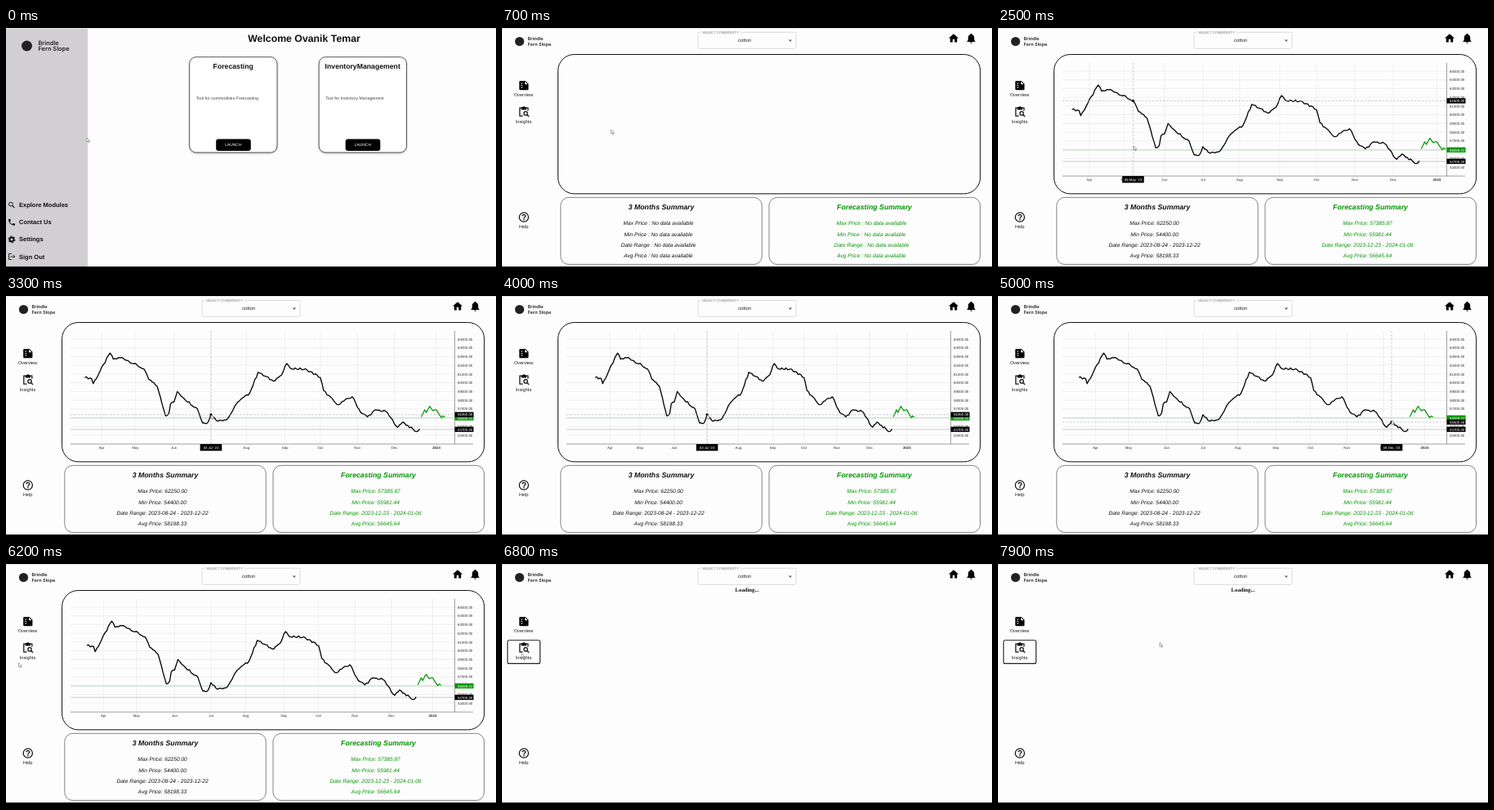
An HTML page that plays this animation: 600 by 295 pixels, repeating every 8 s.

```html
<!DOCTYPE html>
<html lang="en">
<head>
<meta charset="utf-8">
<title>Commodity forecasting dashboard</title>
<style>
  html, body { margin: 0; width: 100%; height: 100%; overflow: hidden; background: #fefdfe; }
  svg { display: block; }
  text { font-family: "Liberation Sans", Arial, sans-serif; text-rendering: geometricPrecision; fill: #111; }
  .mid { text-anchor: middle; }
  .bold { font-weight: 700; }
  .brand { font-family: Inter, sans-serif; font-weight: 600; fill: #222; }
  .loading { font: 700 6.7px "Liberation Serif", serif; }
  .nav text { font-size: 5.7px; fill: #222; }
  .menu text { font-size: 7.5px; font-weight: 700; }
  .cards .card { fill: #fff; stroke: #333; stroke-width: .8; filter: drop-shadow(0 1px 1px #0004); }
  .cards .title { font-size: 8.7px; font-weight: 700; }
  .cards .note { font-size: 5.2px; fill: #444; }
  .cards .launch { font-size: 4.9px; fill: #fff; }
  .panels rect { fill: none; stroke: #444; stroke-width: .65; }
  .panels .main { stroke: #111; stroke-width: 1; }
  .head { font-size: 8.75px; font-weight: 700; font-style: italic; }
  .row { font-size: 6.6px; font-style: italic; }
  .green { fill: #009600; }
  .chart text { font-size: 4.4px; fill: #333; }
  .chart .tag text { fill: #fff; }
  .grid { stroke: #e8e9ec; stroke-width: .7; }
  .line { fill: none; stroke-width: 1.3; stroke-linejoin: round; }
  .dash { stroke: #a4a7ae; stroke-width: .6; stroke-dasharray: 2.4 2; }
</style>
</head>
<body>
<svg width="600" height="295" viewBox="0 0 600 295">
  <rect width="600" height="295" fill="#fefdfe"/>

  <g id="home">
    <rect y="1" width="100" height="293" fill="#d1cfd1"/>
    <circle cx="25.5" cy="22" r="6.5" fill="#222"/>
    <text class="brand" x="39.5" y="21.3" font-size="7.4">Brindle</text>
    <text class="brand" x="39.5" y="28.3" font-size="7.4">Fern Slope</text>
    <g class="menu" id="menu"></g>
    <text class="mid bold" x="365" y="17" font-size="12.3">Welcome Ovanik Temar</text>
    <g class="cards" id="cards"></g>
  </g>

  <g id="dash">
    <circle cx="21.5" cy="16.5" r="5.6" fill="#222"/>
    <text class="brand" x="31.5" y="15.2" font-size="5.6">Brindle</text>
    <text class="brand" x="31.5" y="22" font-size="5.6">Fern Slope</text>
    <rect x="240" y="5.3" width="120" height="20" rx="2" fill="none" stroke="#d2d2d2" stroke-width=".8"/>
    <rect x="243.5" y="3" width="48" height="5" fill="#fefdfe"/>
    <text x="245" y="6.6" font-size="4.35" style="fill:#777">SELECT COMMODITY</text>
    <text class="mid" x="297" y="17.2" font-size="5.9" style="fill:#222">cotton</text>
    <path d="M350.8 14.6h4.4l-2.2 2.3z" fill="#666"/>
    <g class="nav" id="nav"></g>
    <rect id="focus" x="6.8" y="93.8" width="39.8" height="28.6" rx="2" fill="none" stroke="#222" stroke-width="1.1"/>
    <text id="loading" class="loading mid" x="300" y="34">Loading...</text>

    <g id="board">
      <g class="panels">
        <rect class="main" x="68.6" y="32.5" width="517" height="171.3" rx="20"/>
        <rect x="71.8" y="208.3" width="246.5" height="82.3" rx="10"/>
        <rect x="327" y="208.3" width="258.5" height="82.3" rx="10"/>
      </g>
      <text class="head mid" x="195" y="223.2">3 Months Summary</text>
      <text class="head mid green" x="456" y="223.2">Forecasting Summary</text>
      <g id="empty"></g>
      <g id="filled"></g>
      <g class="chart" id="chart">
        <path class="grid" id="grid"/>
        <g id="prices"></g>
        <g id="months"></g>
        <path d="M79 182H572M549.5 43V182" fill="none" stroke="#777" stroke-width=".7"/>
        <path d="M79 150H549" stroke="#a9cba9" stroke-width=".7"/>
        <path d="M79 164H549" stroke="#b4b4b4" stroke-width=".7"/>
        <path class="line" id="past" stroke="#000"/>
        <path class="line" id="future" stroke="#0a9a0a"/>
        <g class="tag">
          <rect x="549.5" y="146.6" width="23" height="6.4" fill="#0a960a"/>
          <text x="553" y="151.5">56059.21</text>
          <rect x="549.5" y="160.7" width="23" height="6.4"/>
          <text x="553" y="165.5">54700.00</text>
        </g>
        <g id="cross">
          <path class="dash" id="crossLines"/>
          <circle id="dot" r="1.6"/>
          <g class="tag" id="priceTag">
            <rect x="549.5" y="-3.2" width="23" height="6.4"/>
            <text x="553" y="1.6"></text>
          </g>
          <g class="tag" id="dateTag">
            <rect x="-13.3" y="182" width="26.6" height="8.3"/>
            <text class="mid" y="187.8"></text>
          </g>
        </g>
      </g>
    </g>
  </g>

  <rect width="600" height=".8" fill="#e4e3e4"/>
  <rect y="293.2" width="600" height="1.8"/>
  <path id="cursor" d="M0 0V5L1.3 4 2.3 6 3.2 5.6 2.3 3.7H4z" fill="#fff" stroke="#555" stroke-width=".5"/>
</svg>

<script>
const $ = id => document.getElementById(id);
const show = (id, on) => { $(id).style.display = on ? "" : "none"; };
const move = (id, x, y) => $(id).setAttribute("transform", `translate(${x} ${y})`);
const draw = (id, d) => $(id).setAttribute("d", d);
const text = (x, y, s, cls = "") => `<text class="${cls}" x="${x}" y="${y}">${s}</text>`;
const icon = (name, cx, cy, size) =>
  `<g transform="translate(${cx - size / 2} ${cy - size / 2}) scale(${size / 24})">${icons[name]}</g>`;
const stroke = (d, w = 2) => `<path d="${d}" fill="none" stroke="#111" stroke-width="${w}"/>`;
const ring = (cx, cy, r, w = 2, dash = "none") =>
  `<circle cx="${cx}" cy="${cy}" r="${r}" fill="none" stroke="#111" stroke-width="${w}" stroke-dasharray="${dash}"/>`;

const icons = {
  search: ring(9.5, 9.5, 5.5, 2.2) + stroke("M13.6 13.6l6 6", 2.6),
  phone: `<path d="M6.6 10.8c1.4 2.8 3.8 5.1 6.6 6.6l2.2-2.2c.3-.3.7-.4 1-.2 1.1.4 2.3.6 3.6.6.6 0 1 .4 1 1V20c0 .6-.4 1-1 1C10.6 21 3 13.4 3 4c0-.6.4-1 1-1h3.5c.6 0 1 .4 1 1 0 1.2.2 2.4.6 3.6.1.3 0 .7-.2 1z"/>`,
  gear: ring(12, 12, 5.6, 4.4) + ring(12, 12, 8.6, 2.8, "4.5 4.5"),
  exit: stroke("M12 4H4V20H12M8 12H20M16 7.5L20.5 12 16 16.5"),
  house: `<path d="M10 20v-6h4v6h5v-8h3L12 3 2 12h3v8z"/>`,
  bell: `<path d="M12 22a2 2 0 0 0 2-2h-4a2 2 0 0 0 2 2zm6-6v-5c0-3.1-1.6-5.6-4.5-6.3V4a1.5 1.5 0 0 0-3 0v.7C7.6 5.4 6 7.9 6 11v5l-2 2v1h16v-1z"/>`,
  report: `<path d="M15 3H5a2 2 0 0 0-2 2v14a2 2 0 0 0 2 2h14a2 2 0 0 0 2-2V9z"/>
    <path d="M14 4.5V10h5.5z" fill="#fff"/><path d="M8 7v2.2M8 11v2.2M8 15v2.2" stroke="#fff" stroke-width="2.2"/>`,
  clip: stroke("M10 20H4V4H20V10M8 5.5H16") + `<path d="M7 3h3a2 2 0 0 1 4 0h3v5H7z"/>` +
    ring(15.5, 15, 3.5) + stroke("M18 17.5L22 21.5"),
  help: ring(12, 12, 9) + stroke("M9 10a3 3 0 0 1 6 0c0 2-3 2-3 5") + `<path d="M11 16h2v2h-2z"/>`
};

// Static content
$("menu").innerHTML = [["search", "Explore Modules"], ["phone", "Contact Us"], ["gear", "Settings"], ["exit", "Sign Out"]]
  .map(([name, label], i) => icon(name, 7, 217.7 + 21.1 * i, 10.5) + text(16, 220.2 + 21.1 * i, label)).join("");

$("cards").innerHTML = [["Forecasting", "commodities Forecasting"], ["InventoryManagement", "Inventory Management"]]
  .map(([title, note], i) => `<g transform="translate(${224.7 + 158.5 * i} 0)">
    <rect class="card" y="35.7" width="107.3" height="117.3" rx="8"/>
    ${text(53.5, 50, title, "title mid")}${text(8, 88, "Tool for " + note, "note")}
    <rect x="32.5" y="136.6" width="42.6" height="14.3" rx="3"/>
    ${text(53.7, 145.3, "LAUNCH", "launch mid")}</g>`).join("");

$("nav").innerHTML = icon("house", 553, 12.6, 14.5) + icon("bell", 574.5, 12.6, 15) +
  [["report", "Overview", 70.5], ["clip", "Insights", 103], ["help", "Help", 232.6]]
    .map(([name, label, y]) => icon(name, 26.8, y, 15) + text(26.5, y + 13.5, label, "mid")).join("");

const rows = (x, values, cls, sep) => ["Max Price", "Min Price", "Date Range", "Avg Price"]
  .map((name, i) => text(x, 242.4 + 13.15 * i, `${name}${sep} ${values[i]}`, "row mid " + cls)).join("");
const none = Array(4).fill("No data available");
$("empty").innerHTML = rows(191.5, none, "", " :") + rows(452.5, none, "green", " :");
$("filled").innerHTML =
  rows(191.5, ["62250.00", "54400.00", "2023-08-24 - 2023-12-22", "58198.33"], "", ":") +
  rows(452.5, ["57385.87", "55981.44", "2023-12-23 - 2024-01-06", "56645.64"], "green", ":");

// One bar per weekday; the forecast, after 22 December, also has weekends
const days = [];
const lastTrade = Date.UTC(2023, 11, 22);
for (let d = Date.UTC(2023, 2, 20); d <= Date.UTC(2024, 0, 6); d += 864e5) {
  const date = new Date(d);
  if (d > lastTrade || date.getUTCDay() % 6) days.push(date);
}
const monthName = d => d.toLocaleString("en-US", { month: "short", timeZone: "UTC" });
const ticks = days.map((d, i) => ({ i, name: d.getUTCMonth() ? monthName(d) : "2024" }))
  .filter(({ i }) => i && days[i].getUTCMonth() !== days[i - 1].getUTCMonth());

// Turning points as bar and price in thousands; the bars between get a little seeded noise
const noise = i => { const v = Math.sin(i * 12.9898) * 43758.5453; return v - Math.floor(v) - .5; };
const mix = (a, b, f) => a + (b - a) * f;

function series(turns, rough) {
  const bars = [];
  turns.slice(1).forEach(([end, price], n) => {
    const [from, base] = turns[n];
    for (let i = from; i < end; i++)
      bars.push([i, mix(base, price, (i - from) / (end - from)) + (i > from ? rough * noise(i) : 0)]);
  });
  return [...bars, turns[turns.length - 1]];
}

const past = series([
  [0, 60.6], [4, 60.5], [5, 59.9], [15, 63.4], [17, 62.7], [22, 62.9], [35, 61.6], [38, 60.4], [43, 59.6],
  [48, 56.2], [50, 56.5], [51, 57.6], [53, 57.8], [55, 59], [59, 58.2], [67, 57], [70, 55.4], [73, 55.4],
  [75, 56.35], [79, 55.6], [85, 55.9], [91, 57.8], [98, 58.8], [103, 61.2], [112, 60.2], [117, 60.9],
  [120, 62.2], [122, 61.7], [132, 61.5], [140, 60.6], [142, 59.1], [150, 57.5], [159, 58.4], [164, 56.6],
  [168, 56.1], [173, 56.9], [179, 56.7], [186, 54.9], [189, 55.5], [197, 54.4], [199, 54.7]
], .25);
const future = series([[200, 56.1], [202, 56.9], [203, 56.6], [205, 57.3], [207, 56.8], [209, 56.9],
  [212, 56], [213, 56.2], [214, 56.06]], .1);

const priceY = k => 53 + 10.73 * (65 - k);
const barX = (i, zoom) => 252 + (90.6 + 2.138 * i - 252) * zoom;
const barAt = (x, zoom) => Math.round(((x - 252) / zoom + 252 - 90.6) / 2.138);
const curve = (bars, zoom) => "M" + bars.map(([i, k]) => `${barX(i, zoom)} ${priceY(k)}`).join("L");

const levels = Array.from({ length: 12 }, (_, n) => 54 + n);
$("prices").innerHTML = levels.map(k => text(553, priceY(k) + 1.6, k + "000.00")).join("");
const priceLines = levels.map(k => `M79 ${priceY(k)}H549`).join("");

// Glides: start time, end time, then the values reached
const pointer = [
  [100, 400, 268, 143], [500, 700, 133.5, 125], [1300, 1800, 166, 145], [2800, 3100, 251, 146],
  [4400, 5000, 482, 153], [5100, 5300, 440, 146], [5400, 5700, 300, 130], [5800, 6000, 56, 122],
  [6100, 6200, 15.5, 121.5], [6200, 6400, 24, 110], [7100, 7300, 160, 100], [7500, 7900, 198, 96.5]
];
const zooms = [[3200, 3600, .854], [4000, 4300, .9476]];

const glide = (moves, start, t) => moves.reduce((now, [from, to, ...goal]) => {
  const f = Math.min(1, Math.max(0, (t - from) / (to - from)));
  return now.map((v, n) => mix(v, goal[n], f));
}, start);

function drawChart(zoom) {
  draw("past", curve(past, zoom));
  draw("future", curve(future, zoom));
  draw("grid", priceLines + ticks.map(({ i }) => `M${barX(i, zoom)} 43V182`).join(""));
  $("months").innerHTML = ticks.map(({ i, name }) =>
    text(barX(i, zoom), 188, name, name === "2024" ? "mid bold" : "mid")).join("");
}

function drawCross(mouseX, zoom) {
  const [i, price] = past[Math.min(past.length - 1, Math.max(0, barAt(mouseX, zoom)))];
  const x = barX(i, zoom), y = priceY(price), d = days[i];
  draw("crossLines", `M${x} 43V182M79 ${y}H549`);
  move("dot", x, y);
  move("priceTag", 0, y);
  move("dateTag", x, 0);
  $("priceTag").lastElementChild.textContent = (Math.round(price * 20) * 50).toFixed(2);
  $("dateTag").lastElementChild.textContent =
    `${String(d.getUTCDate()).padStart(2, "0")} ${monthName(d)} '${d.getUTCFullYear() % 100}`;
}

function render(t) {
  const [x, y] = glide(pointer, [99, 135], t), [zoom] = glide(zooms, [1], t);
  const live = t >= 2500, hover = live && t < 6000;
  show("home", t < 500);
  show("dash", t >= 500);
  show("board", t < 6600);
  show("loading", t >= 6600);
  show("focus", t >= 6500);
  show("empty", !live);
  show("filled", live);
  show("chart", live);
  show("cross", hover);
  if (live) drawChart(zoom);
  if (hover) drawCross(x, zoom);
  move("cursor", x, y);
}

// The screen advances in steps of 100 ms
const start = performance.now();
let shown = -1;
function tick() {
  const t = Math.floor((performance.now() - start) % 8000 / 100) * 100;
  if (t !== shown) render(shown = t);
  requestAnimationFrame(tick);
}
tick();
</script>
</body>
</html>
```
